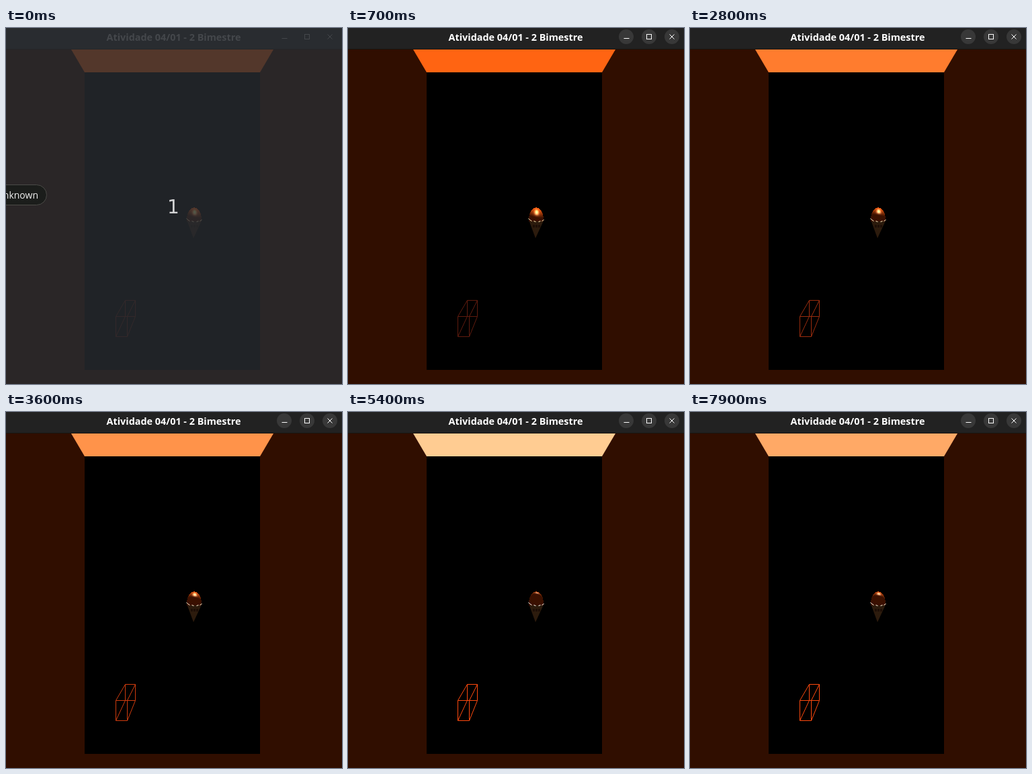
Write an HTML page with a canvas that moves like this. It is 500x530 px and loops after 8 s.

```html
<!DOCTYPE html>
<html>
<head>
<meta charset="utf-8">
<style>
html, body { margin: 0; height: 100%; overflow: hidden; background: #300e00; }
canvas { display: block; }
</style>
</head>
<body>
<canvas id="stage" width="500" height="530"></canvas>
<script>
const ctx = document.getElementById('stage').getContext('2d');
const LOOP = 8000, TICK = 100;
const clamp = (v, lo, hi) => Math.min(hi, Math.max(lo, v));
const rgb = (r, g, b) => `rgb(${r | 0},${g | 0},${b | 0})`;
const gray = v => rgb(v, v, v);

function path(points, close) {
  ctx.beginPath();
  points.forEach(([x, y]) => ctx.lineTo(x, y));
  if (close) ctx.closePath();
}

function fillShape(points, color) {
  path(points, true);
  ctx.fillStyle = color;
  ctx.fill();
}

function strokeLine(points, color) {
  path(points.map(([x, y]) => [x + .5, y + .5]));
  ctx.strokeStyle = color;
  ctx.stroke();
}

function box(x, y, w, h, color) {
  ctx.fillStyle = color;
  ctx.fillRect(x, y, w, h);
}

function label(text, x, y, font, color, align) {
  ctx.font = font;
  ctx.textAlign = align;
  ctx.fillStyle = color;
  ctx.fillText(text, x, y);
}

// Light travel: one key press, a pause, then key repeat; later the same backwards.
function lightAt(tick) {
  return (tick >= 15 ? .3 : 0) + clamp(tick - 19, 0, 39)
       - (tick >= 60 ? .3 : 0) - Math.max(0, tick - 64.7);
}

function drawRoom(p) {
  box(0, 0, 500, 530, '#300e00');
  const ceiling = rgb(255, 100 + 2.55 * p + .0113 * p * p, 18 + 2.9 * p + .0207 * p * p);
  fillShape([[97, 32], [398, 32], [378, 66], [117, 66]], ceiling);
  box(117, 66, 261, 443, '#000');
}

function drawWire(p) {
  const red = Math.min(255, 95 + 6.4 * p);
  const color = rgb(red, red * .29, 14);
  strokeLine([[163, 459], [163, 429], [177, 405], [192, 405], [192, 429], [180, 459],
    [163, 459], [177, 429], [177, 405]], color);
  strokeLine([[163, 429], [192, 429]], color);
  strokeLine([[180, 459], [180, 429], [192, 405]], color);
}

function drawCone() {
  fillShape([[269.5, 287], [291, 287], [279, 313]], '#2c1b0d');
  for (let x = 275; x < 285; x += 4) box(x, 293, 3, 4, '#1d0e06');
}

// Half ellipsoid shaded pixel by pixel with diffuse and specular light.
function drawScoop(p) {
  const angle = p * .018;
  const lx = .1, ly = Math.cos(angle), lz = .12 - Math.sin(angle);
  const len = Math.hypot(lx, ly, lz + 1);
  for (let y = 267; y < 288; y++) {
    for (let x = 268; x < 292; x++) {
      const u = (x + .5 - 280) / 11.5, v = (287.5 - y) / 20.6;
      const rest = 1 - u * u - v * v;
      if (rest < 0) continue;
      const w = Math.sqrt(rest);
      const diffuse = Math.max(0, u * lx + v * ly + w * lz - .4);
      const facing = (u * lx + v * ly + w * (lz + 1)) / len;
      const shine = Math.pow(Math.max(0, facing), 30) * Math.min(1, diffuse * 5);
      box(x, y, 1, 1, rgb(
        Math.min(255, 58 + 330 * diffuse + 255 * shine),
        Math.min(255, 16 + 135 * diffuse + 225 * shine),
        Math.min(255, 33 * diffuse + (165 + p) * shine)));
    }
  }
  const rim = rgb(255, 235 + p / 2, 180 + p * 1.8);
  strokeLine([[268, 283], [270, 285], [273, 287]], rim);
  strokeLine([[276, 287], [279, 288]], rim);
  strokeLine([[283, 288], [286, 287]], rim);
  strokeLine([[288, 287], [291, 285]], rim);
}

function drawTitleBar(focus) {
  box(0, 0, 500, 31, gray(43 - 9 * focus));
  box(0, 31, 500, 1, '#181510');
  const ink = gray(180 + 75 * focus);
  label('Atividade 04/01 - 2 Bimestre', 249.5, 19, 'bold 14.4px "Open Sans", sans-serif', ink, 'center');
  for (const x of [414, 448, 482]) {
    ctx.beginPath();
    ctx.arc(x, 13, 11, 0, 7);
    ctx.fillStyle = `rgba(56,56,56,${focus})`;
    ctx.fill();
  }
  strokeLine([[410, 15], [418, 15]], ink);
  ctx.strokeRect(444.5, 9.5, 7, 7);
  strokeLine([[478, 9], [485, 16]], ink);
  strokeLine([[485, 9], [478, 16]], ink);
}

function drawPill(alpha) {
  ctx.globalAlpha = alpha;
  ctx.beginPath();
  ctx.roundRect(-40, 233.5, 100.5, 30, 15);
  ctx.fillStyle = '#1b1d1b';
  ctx.fill();
  ctx.strokeStyle = '#4b4b47';
  ctx.stroke();
  label('Unknown', 48, 254, '14px "Open Sans", sans-serif', '#f0f0f0', 'right');
  ctx.globalAlpha = 1;
}

function drawCountdown() {
  box(0, 0, 500, 530, 'rgba(40,44,49,.8)');
  label('1', 249, 276, '28px "DejaVu Sans", sans-serif', '#d2d3d4', 'center');
}

function draw(now) {
  const tick = Math.floor(now % LOOP / TICK);
  const p = lightAt(tick);
  const focus = clamp((tick - 5) / 2, 0, 1);
  ctx.lineWidth = 1;
  drawRoom(p);
  drawWire(p);
  drawCone();
  drawScoop(p);
  drawTitleBar(focus);
  if (tick === 0) drawCountdown();
  if (focus < 1) drawPill(1 - focus);
  requestAnimationFrame(() => draw(performance.now() - start));
}

const start = performance.now();
draw(0);
</script>
</body>
</html>
```
